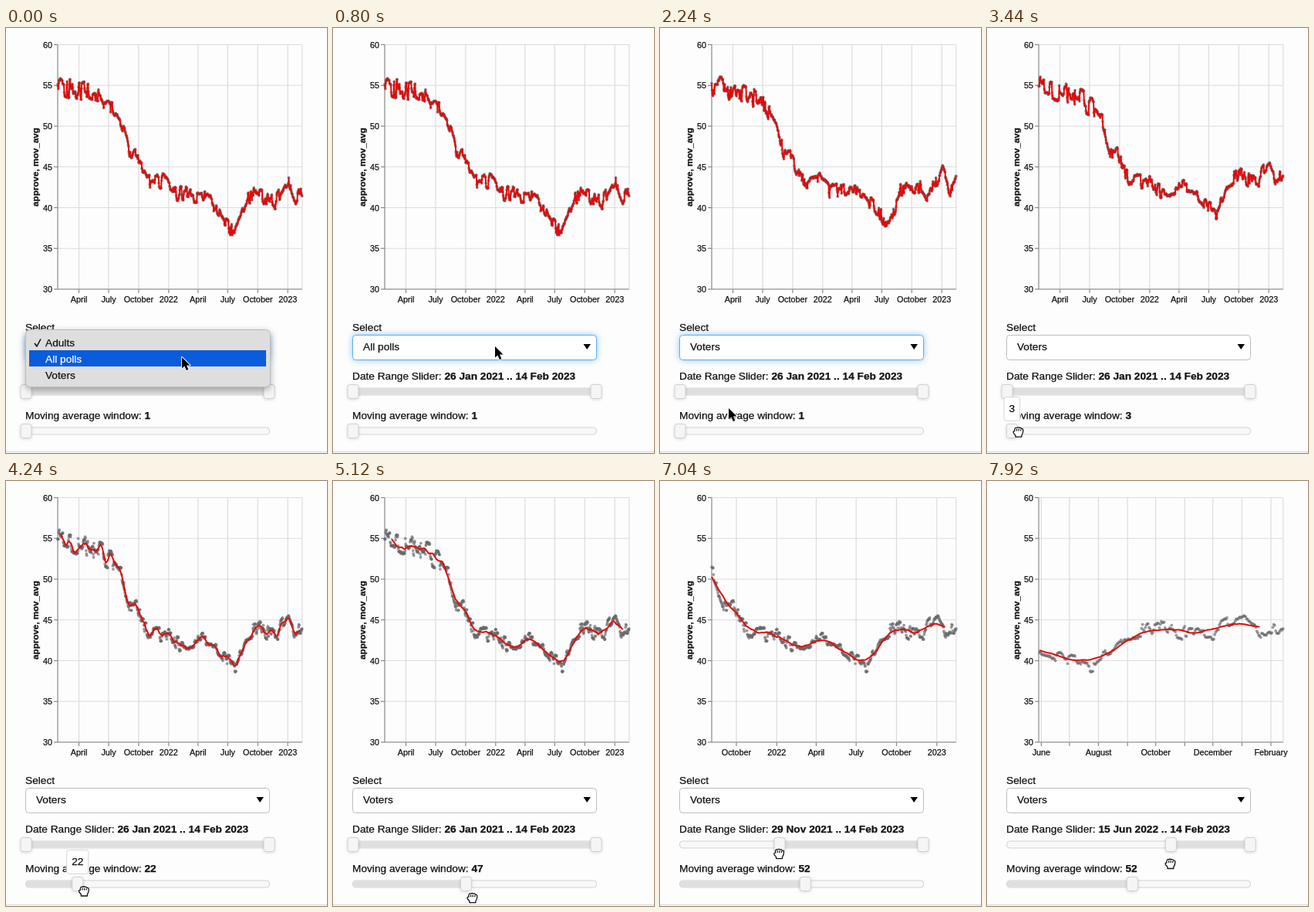
These frames come from a looping animation (416x550 px, 8000 ms). An HTML page with a canvas:

```html
<!DOCTYPE html>
<html lang="en">
<head>
<meta charset="utf-8">
<title>Poll explorer</title>
<style>
  html, body { margin: 0; width: 100%; height: 100%; overflow: hidden; background: #fdfdfd; }
  canvas { display: block; width: 416px; height: 550px; }
</style>
</head>
<body>
<canvas id="stage" width="416" height="550"></canvas>
<script>
const ctx = document.getElementById('stage').getContext('2d');
const LOOP = 8000, STEP = 80, DAYS = 749, DAY_MS = 864e5, CHART_LAG = 240;
const FIRST_DAY = Date.UTC(2021, 0, 26);
const PLOT = { left: 67, right: 383.8, top: 21.5, bottom: 338 };
const TRACK = { left: 26, right: 341, width: 315 };
const FONT = '"Liberation Sans", Arial, sans-serif';
const OPTIONS = ['Adults', 'All polls', 'Voters'];

// [day, approval] turning points shared by all groups
const TREND = [[0, 55], [120, 53.8], [161, 52.4], [196, 50.2], [222, 46.4], [241, 46.4], [286, 43],
  [333, 43.4], [366, 42.1], [461, 42.6], [499, 41], [543, 38.9], [580, 43.3], [612, 44.1],
  [664, 42.8], [708, 45.6], [730, 43.4], [749, 44]];

// [time, x, y] where the pointer rests or turns between drags
const POINTER = [[320, 228, 426], [720, 210, 412], [1520, 210, 412], [1840, 202, 428],
  [2240, 89, 492], [2480, 28, 518], [3280, 34, 521], [5300, 196, 541], [5800, 25, 478]];

const progress = (t, from, to) => Math.max(0, Math.min(1, (t - from) / (to - from)));
const smooth = p => p * p * (3 - 2 * p);

function follow(keys, pos, ease = p => p) {
  const found = keys.findIndex(key => key[0] > pos);
  const i = found < 0 ? keys.length - 1 : Math.max(found, 1);
  const from = keys[i - 1], to = keys[i], p = ease(progress(pos, from[0], to[0]));
  return to.slice(1).map((v, k) => from[k + 1] + (v - from[k + 1]) * p);
}

// Polls linger around a level, then jump to a new one
function makeSeries(group) {
  let seed = 4321 + group * 7919, level = 0, noise = 0;
  const random = () => (seed = (seed * 16807) % 2147483647) / 2147483647;
  random();
  return Array.from({ length: DAYS + 1 }, (_, day) => {
    if (random() < 0.24) level = (random() - 0.5) * (day < 200 ? 2.6 : 1.9);
    noise += (level - noise) * 0.65;
    const gap = (2 - group) * 1.1 * smooth(progress(day, 300, 560));
    return follow(TREND, day)[0] - gap + noise + (random() - 0.5) * 0.25;
  });
}

const series = OPTIONS.map((_, group) => makeSeries(group));
const sums = series.map(values => {
  const total = [0];
  values.forEach((v, i) => total.push(total[i] + v));
  return total;
});

const windowDrag = t => progress(t, 3280, 5300);
const rangeDrag = t => progress(t, 6480, 7920);
const windowAt = t => Math.round(1 + 51 * windowDrag(t) ** 1.2);
const rangeStartAt = t => 505 * (1 - (1 - rangeDrag(t)) ** 1.9);

function text(str, x, y, { size = 13.7, bold = false, align = 'left', color = '#111' } = {}) {
  ctx.font = `${bold ? 'bold ' : ''}${size}px ${FONT}`;
  ctx.textAlign = align;
  ctx.fillStyle = ctx.strokeStyle = color;
  ctx.lineWidth = 0.25;
  ctx.fillText(str, x, y);
  ctx.strokeText(str, x, y);
  return ctx.measureText(str).width;
}

function line(x1, y1, x2, y2, color) {
  ctx.strokeStyle = color;
  ctx.lineWidth = 1.2;
  ctx.beginPath();
  ctx.moveTo(x1, y1);
  ctx.lineTo(x2, y2);
  ctx.stroke();
}

function box(x, y, w, h, r, fill, stroke, shadow, blur = 4, dy = 1) {
  ctx.save();
  ctx.beginPath();
  ctx.roundRect(x, y, w, h, r);
  if (shadow) {
    ctx.shadowColor = shadow;
    ctx.shadowBlur = blur;
    ctx.shadowOffsetY = dy;
  }
  ctx.fillStyle = fill;
  ctx.fill();
  ctx.restore();
  if (!stroke) return;
  ctx.strokeStyle = stroke;
  ctx.lineWidth = 1;
  ctx.stroke();
}

const valueY = v => PLOT.bottom - (v - 30) / 30 * (PLOT.bottom - PLOT.top);
const monthName = (date, style) =>
  new Date(date).toLocaleString('en-US', { month: style, timeZone: 'UTC' });

function dateTicks(start, dayX) {
  const every = DAYS - start > 416 ? 3 : 1, ticks = [];
  for (let month = 0; month <= 25; month += every) {
    const date = Date.UTC(2021, month, 1), day = (date - FIRST_DAY) / DAY_MS;
    if (day < start || day > DAYS) continue;
    ticks.push({ x: dayX(day), label: month % 12 ? monthName(date, 'long') : String(2021 + month / 12) });
  }
  return ticks;
}

// Drop every other label until none overlap
function thinLabels(ticks) {
  ctx.font = `10.8px ${FONT}`;
  const half = tick => ctx.measureText(tick.label).width / 2;
  let kept = ticks;
  while (kept.some((tick, i) => i && tick.x - half(tick) < kept[i - 1].x + half(kept[i - 1]) + 1))
    kept = kept.filter((_, i) => i % 2 === 0);
  return kept;
}

function drawChart(group, windowSize, start) {
  const { left, right, top, bottom } = PLOT;
  const dayX = day => left + (right - left) * (day - start) / (DAYS - start);
  const ticks = dateTicks(start, dayX);

  for (const { x } of ticks) {
    line(x, top, x, bottom, '#dcdcdc');
    line(x, bottom, x, bottom + 5, '#888');
  }
  for (let v = 30; v <= 60; v += 5) {
    const y = valueY(v);
    line(left, y, right, y, '#dcdcdc');
    line(left - 5, y, left, y, '#888');
    text(String(v), 60, y + 4, { size: 10.8, align: 'right' });
  }
  line(right, top, right, bottom, '#dcdcdc');
  line(left, top, left, bottom, '#888');
  line(left, bottom, right, bottom, '#888');
  for (const { x, label } of thinLabels(ticks)) text(label, x, 354.5, { size: 10.8, align: 'center' });

  ctx.save();
  ctx.translate(42, 180);
  ctx.rotate(-Math.PI / 2);
  text('approve, mov_avg', 0, 0, { size: 11.6, bold: true, align: 'center' });
  ctx.restore();

  const first = Math.ceil(start);
  ctx.fillStyle = 'rgba(105,105,105,.68)';
  for (let day = first; day <= DAYS; day++) {
    ctx.beginPath();
    ctx.arc(dayX(day), valueY(series[group][day]), 1.9, 0, 7);
    ctx.fill();
  }

  const before = Math.floor(windowSize / 2), total = sums[group];
  ctx.beginPath();
  for (let day = first; day <= DAYS; day++) {
    const from = day - before, to = from + windowSize;
    if (from < 0 || to > DAYS + 1) continue;
    ctx.lineTo(dayX(day), valueY((total[to] - total[from]) / windowSize));
  }
  ctx.strokeStyle = '#e60808';
  ctx.lineWidth = 2;
  ctx.lineJoin = 'round';
  ctx.stroke();
}

function drawSelect(value, focused) {
  text('Select', 25, 391.5);
  box(25.5, 397.5, 316, 32, 4, '#fff', focused ? '#5fb0e6' : '#bdbdbd',
    focused && 'rgba(80,170,235,.7)', 8, 0);
  text(OPTIONS[value], 39, 417);
  ctx.fillStyle = '#000';
  ctx.fill(new Path2D('M324.5 409H334L329.2 416Z'));
}

function drawTrack(y, from, to, handles) {
  box(TRACK.left - 0.5, y - 4.5, TRACK.width + 1, 9, 4, '#f8f8f8', '#d2d2d2');
  box(from, y - 4, to - from, 8, 3, '#dfdfdf');
  for (const x of handles) box(x - 7, y - 9, 14, 18, 3, '#f5f5f5', '#d2d2d2', 'rgba(0,0,0,.18)');
}

function drawTooltip(label, x, top) {
  ctx.font = `13.7px ${FONT}`;
  const width = ctx.measureText(label).width + 13;
  box(x - width / 2, top + 0.5, width, 31, 3, '#fff', '#d6d6d6');
  text(label, x, top + 20, { align: 'center' });
}

function formatDay(day) {
  const date = new Date(FIRST_DAY + Math.round(day) * DAY_MS);
  const number = String(date.getUTCDate()).padStart(2, '0');
  return `${number} ${monthName(date, 'short')} ${date.getUTCFullYear()}`;
}

function drawMenu(checked, hovered) {
  const top = 390 - checked * 21;
  box(25.5, top + 0.5, 317, 74, 6, '#dedede', '#bcbcbc', 'rgba(0,0,0,.35)', 10, 3);
  OPTIONS.forEach((name, i) => {
    const y = top + 22 + i * 21, active = i === hovered, color = active ? '#fff' : '#111';
    if (active) box(30, y - 16, 307, 21, 0, '#0a5cdb');
    if (i === checked) {
      ctx.strokeStyle = color;
      ctx.lineWidth = 1.6;
      ctx.stroke(new Path2D(`M37 ${y - 4}l3 4l5 -9.5`));
    }
    text(name, 51, y, { color });
  });
}

const ARROW = new Path2D('M0 0V14.5L3.4 11.4L5.8 17L8.4 15.9L6 10.5H10.5Z');
const FIST = new Path2D('M-4.5-1Q-7-1-6 1.5L-3.5 4.5V6.5H4.5V4.5Q6.5 2 6.5-2Q6-4.5 4-4' +
  'Q3-6 1.4-5Q-.2-6.5-1.6-5Q-4-6-4.5-3Z');
const FINGERS = new Path2D('M-1.8-3.5V-1M.8-3.5V-1M3.4-3V-1');

function drawCursor(x, y, hand) {
  ctx.save();
  ctx.translate(x, y);
  ctx.lineJoin = 'round';
  ctx.lineWidth = hand ? 1.3 : 1.8;
  ctx.strokeStyle = hand ? '#111' : '#fff';
  ctx.fillStyle = hand ? '#fff' : '#000';
  const shape = hand ? FIST : ARROW;
  if (hand) ctx.fill(shape);
  ctx.stroke(shape);
  if (hand) ctx.stroke(FINGERS);
  else ctx.fill(shape);
  ctx.restore();
}

function pointerAt(t, windowX, startX) {
  const w = windowDrag(t), r = rangeDrag(t);
  if (r > 0) return [startX - 1, 478 + 17 * r ** 1.5];
  if (w > 0 && w < 1) return [windowX + 8, 521 + 20 * w];
  return follow(POINTER, t, smooth);
}

function draw(t) {
  ctx.fillStyle = '#fdfdfd';
  ctx.fillRect(0, 0, 416, 550);
  line(0, 548.5, 416, 548.5, '#d8d8d8');

  const selected = t < 320 ? 0 : t < 1840 ? 1 : 2;
  const shown = t < 880 ? 0 : t < 2400 ? 1 : 2;
  const windowSize = windowAt(t), rangeStart = rangeStartAt(t);
  const startX = TRACK.left + rangeStart / DAYS * TRACK.width;
  const windowX = TRACK.left + (windowSize - 1) / 99 * TRACK.width;
  const [x, y] = pointerAt(t, windowX, startX);
  const onWindow = t >= 2480 && t < 5300, onRange = t >= 5760;

  drawChart(shown, windowAt(t - CHART_LAG), rangeStartAt(t - CHART_LAG));
  drawSelect(selected, t < 3200);

  const dateLabel = text('Date Range Slider: ', 25, 454.5);
  text(`${formatDay(rangeStart)} .. ${formatDay(DAYS)}`, 25 + dateLabel, 454.5, { bold: true });
  drawTrack(470.5, startX, TRACK.right, [startX, TRACK.right]);

  const windowLabel = text('Moving average window: ', 25, 505.5);
  text(String(windowSize), 25 + windowLabel, 505.5, { bold: true });
  drawTrack(521.5, TRACK.left, windowX, [windowX]);

  if (onWindow && y < 531) drawTooltip(String(windowSize), windowX, 477);
  if (onRange && y < 480) drawTooltip(formatDay(rangeStart), startX, 426);

  if (t < 320) drawMenu(0, 1);
  if (t >= 1520 && t < 1840) drawMenu(1, y < 417 ? 1 : 2);
  drawCursor(x, y, onWindow || onRange);
}

function frame() {
  draw(Math.floor(performance.now() % LOOP / STEP) * STEP);
  requestAnimationFrame(frame);
}
frame();
</script>
</body>
</html>
```
